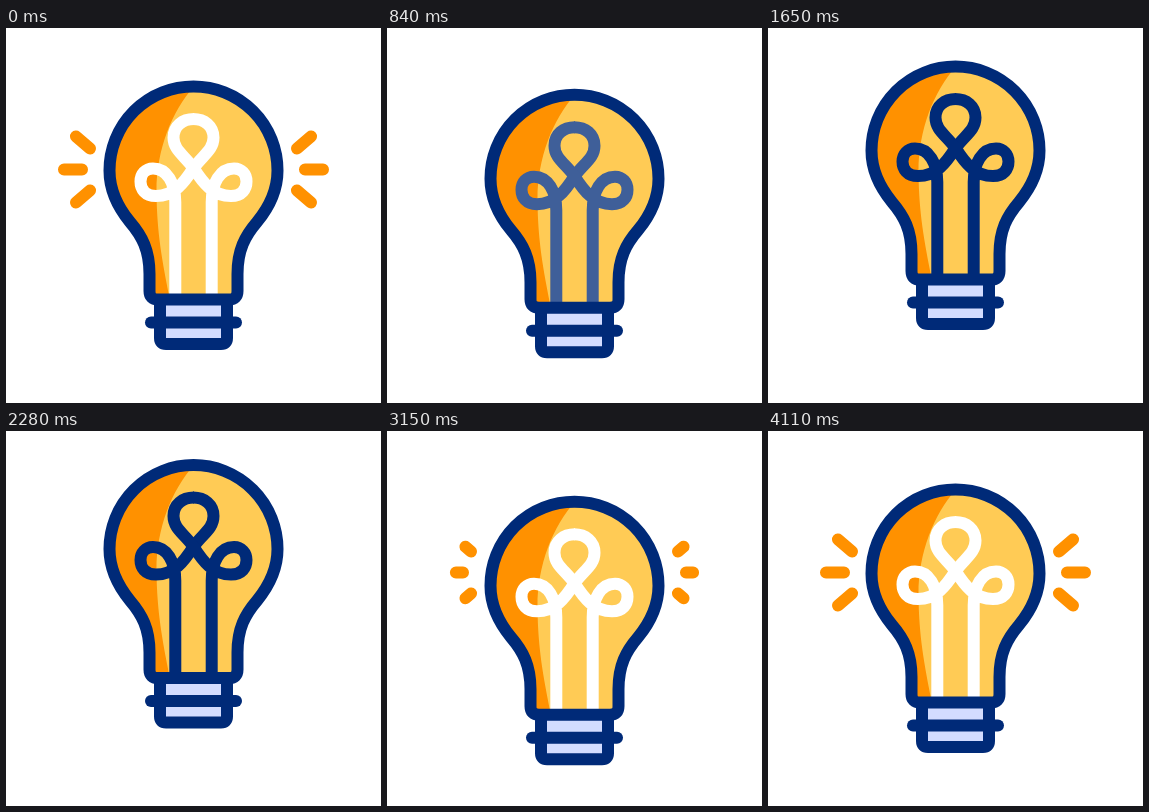
An HTML page that plays this animation: 375x375 px, repeating every 4500 ms.

```html
<!DOCTYPE html>
<html lang="en">
<head>
<meta charset="utf-8">
<title>Light bulb</title>
<style>
  html, body { margin: 0; width: 100%; height: 100%; overflow: hidden; background: #fff; }
  svg { display: block; width: 100%; height: 100%; }
  .line { fill: none; stroke: #002a78; stroke-width: 12; stroke-linecap: round; stroke-linejoin: round; }
  #rays { fill: none; stroke: #ff9100; stroke-width: 12; stroke-linecap: round; }
  #filament { fill: none; stroke-width: 12; stroke-linejoin: round; }
</style>
</head>
<body>
<svg viewBox="0 0 375 375">
  <defs>
    <path id="glass" d="M152 271.5 Q143.5 271.5 143.5 263 V246 C143.5 222 136 208 124 194
      C110 177 103.5 161 103.5 142.5 A84 84 0 0 1 271.5 142.5
      C271.5 161 265 177 251 194 C239 208 231.5 222 231.5 246 V263 Q231.5 271.5 223 271.5 Z"/>
    <clipPath id="inside"><use href="#glass"/></clipPath>
    <path id="strand" d="M169.3 272 V174 C169.3 155 161 140.5 147 140.5
      C139.5 140.5 134.5 146 134.5 153.5 C134.5 161 139 168 150 168
      C168 168 178 155 187.5 140 C197 127 207.5 122 207.5 109.5 C207.5 98 198.5 91 187 91"/>
  </defs>
  <path id="rays"/>
  <g id="bulb">
    <path class="line" style="fill:#d3dcff" d="M154 272 V310 Q154 316 160 316 H215 Q221 316 221 310 V272"/>
    <path class="line" d="M145 294.5 H230"/>
    <g clip-path="url(#inside)">
      <rect x="95" y="50" width="185" height="230" fill="#ffcb55"/>
      <path fill="#ff9100" d="M190 56 C166 82 150 122 150.5 165 C151 205 156 232 164 272 H90 V56 Z"/>
      <g id="filament">
        <use href="#strand"/>
        <use href="#strand" transform="translate(375 0) scale(-1 1)"/>
      </g>
    </g>
    <use href="#glass" class="line"/>
  </g>
</svg>
<script>
const LOOP = 4500;
const $ = id => document.getElementById(id);
const bulb = $('bulb'), rays = $('rays'), filament = $('filament');

const WHITE = [255, 255, 255], NAVY = [0, 42, 120];
const RAYS = [[84, 120.5, 70, 108.5], [76, 141.5, 58, 141.5], [84, 162.5, 70, 174.5]];

const mix = (a, b, p) => a + (b - a) * p;
const ramp = (t, from, to) => Math.min(1, Math.max(0, (t - from) / (to - from)));
const sine = p => (1 - Math.cos(Math.PI * p)) / 2;

// Cubic easing with flat ends: handles at (x1, 0) and (x2, 1)
function flatEase(x1, x2) {
  return p => {
    let lo = 0, hi = 1;
    for (let i = 0; i < 24; i++) {
      const s = (lo + hi) / 2, r = 1 - s;
      if (3 * r * r * s * x1 + 3 * r * s * s * x2 + s * s * s < p) lo = s; else hi = s;
    }
    return lo * lo * (3 - 2 * lo);
  };
}

// [time, offset, easing into this key]
const LIFT = [
  [320, 0],
  [600, 13.8, sine],
  [2400, -24.5, flatEase(0.226, 0.192)],
  [3060, 13.8, sine],
  [3600, -9, sine],
  [4090, 0, sine]
];

function lift(t) {
  for (let i = 1; i < LIFT.length; i++) {
    const [t0, y0] = LIFT[i - 1], [t1, y1, ease] = LIFT[i];
    if (t < t1) return mix(y0, y1, ease(ramp(t, t0, t1)));
  }
  return 0;
}

function rayPath(p) {
  if (p <= 0) return '';
  return RAYS.map(([x0, y0, x1, y1]) => {
    const x = mix(x0, x1, p), y = mix(y0, y1, p);
    return `M${x0} ${y0}L${x} ${y}M${375 - x0} ${y0}L${375 - x} ${y}`;
  }).join('');
}

function draw(t) {
  const glow = t < 2000 ? 1 - sine(ramp(t, 360, 620)) : sine(ramp(t, 3030, 3310));
  const dark = ramp(t, 570, 930) - ramp(t, 2990, 3110);
  bulb.setAttribute('transform', `translate(0 ${lift(t).toFixed(3)})`);
  rays.setAttribute('d', rayPath(glow));
  filament.setAttribute('stroke', `rgb(${WHITE.map((c, i) => Math.round(mix(c, NAVY[i], dark)))})`);
}

const start = performance.now();
function tick(now) {
  draw(Math.max(0, now - start) % LOOP);
  requestAnimationFrame(tick);
}
draw(0);
requestAnimationFrame(tick);
</script>
</body>
</html>
```
